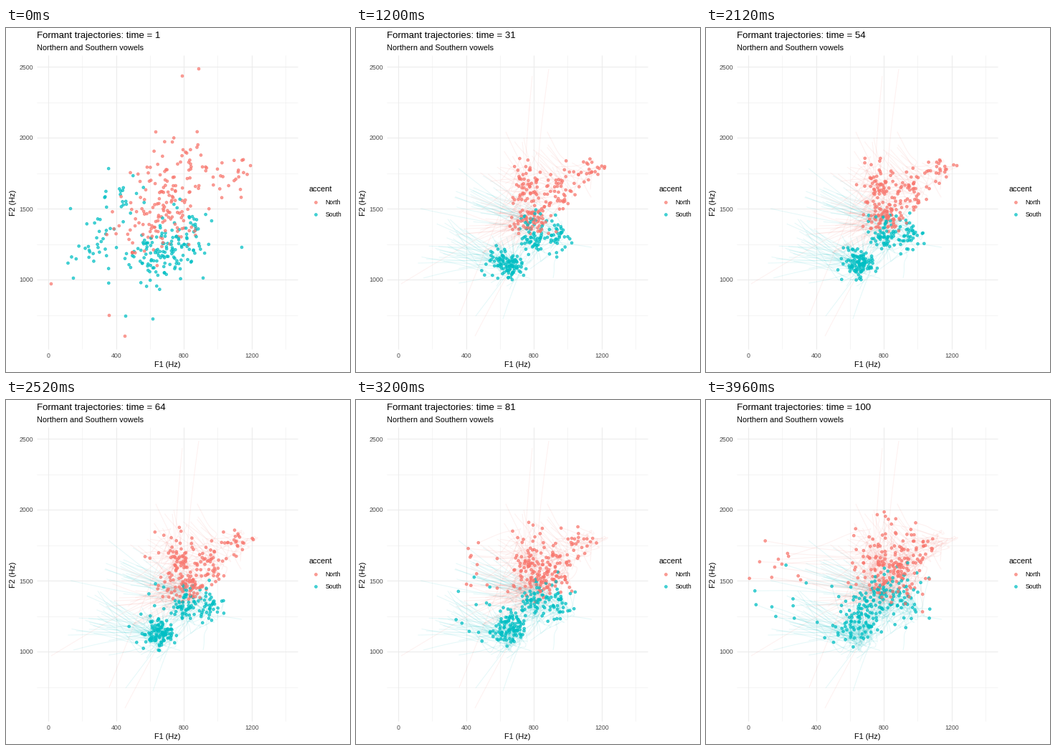
Animation of 480 by 480 pixels, one loop 4 s. Source, as a matplotlib script:

```python
import numpy as np
import matplotlib.pyplot as plt
from matplotlib.animation import FuncAnimation
from matplotlib.collections import LineCollection
from matplotlib.colors import to_rgba

plt.rcParams["font.family"] = "Liberation Sans"

SIZE, DPI = 480, 72
FRAMES, INTERVAL = 100, 40
LEFT, RIGHT, TOP, BOTTOM = 43, 407, 38, 448
NORTH, SOUTH = "#F8766D", "#00BFC4"
rng = np.random.default_rng(12)
time = np.arange(FRAMES)[:, None, None]


def px(f1):
    return 59.2 + f1 * 0.2362


def py(f2):
    return 351.3 - (f2 - 1000) * 0.198


def vowel(n, start, mid, end, spread, tail=0.06):
    """Tracks of n tokens: scattered onset, tight middle, loose offset."""
    own = rng.normal(size=(n, 2))

    def cloud(centre, scale):
        z = 0.6 * own + 0.8 * rng.normal(size=(n, 2))
        return centre + np.clip(z, -2.3, 2.3) * scale * np.array(spread)

    a, b, c = cloud(start, 1.9), cloud(mid, 1), cloud(end, 1.7)

    # some tokens lose their first formant at the end
    lost = rng.random(n) < tail
    c[lost, 0] = rng.uniform(px(0), px(500), lost.sum())

    onset = np.exp(-time / 16)
    power = rng.uniform(1.2, 2.2, (n, 1))
    offset = np.clip((time - 35) / 64, 0, 1) ** power
    beat = rng.uniform(0.05, 0.2, (n, 2))
    phase = rng.uniform(0, 2 * np.pi, (n, 2))
    waver = 1.2 * np.sin(time * beat + phase)
    track = b + (a - b) * onset + (c - b) * offset + waver
    track[..., 0] = np.maximum(track[..., 0], px(0))
    return track


def accent(vowels, strays):
    """Join the vowels; a few tokens begin far outside the clouds."""
    tracks = np.concatenate(vowels, axis=1)
    picks = rng.choice(tracks.shape[1], len(strays), replace=False)
    tracks[:, picks] += (strays - tracks[0, picks]) * np.exp(-time / 11)
    return tracks


north = accent([
    vowel(23, (308, 205), (329, 197), (300, 200), (12, 9), 0),
    vowel(46, (253, 214), (290, 227), (273, 234), (13, 16)),
    vowel(56, (218, 224), (241, 214), (244, 222), (10, 17)),
    vowel(72, (203, 280), (250, 268), (252, 238), (14, 12)),
], [(63, 357), (246, 67), (269, 57), (209, 145), (166, 430), (144, 401)])

south = accent([
    vowel(72, (204, 324), (218, 333), (217, 305), (9, 10), 0.1),
    vowel(32, (130, 303), (212, 332), (206, 307), (10, 12), 0.16),
    vowel(40, (238, 306), (250, 295), (246, 273), (8, 7)),
    vowel(38, (258, 290), (285, 290), (282, 275), (9, 14), 0),
    vowel(22, (163, 240), (258, 274), (250, 262), (9, 10)),
], [(90, 252), (94, 349), (329, 306), (205, 406), (167, 402)])

hues = np.repeat([NORTH, SOUTH], [north.shape[1], south.shape[1]])
tracks = np.concatenate([north, south], axis=1)
order = rng.permutation(len(hues))
tracks, hues = tracks[:, order], hues[order]

fig = plt.figure(figsize=(SIZE / DPI, SIZE / DPI), dpi=DPI, facecolor="white")
ax = fig.add_axes([0, 0, 1, 1])
ax.set_xlim(0, SIZE)
ax.set_ylim(SIZE, 0)
ax.axis("off")


def grid(f1s, f2s, width):
    style = dict(colors="#EBEBEB", lw=width, zorder=0)
    ax.vlines([px(f) for f in f1s], TOP, BOTTOM, **style)
    ax.hlines([py(f) for f in f2s], LEFT, RIGHT, **style)


def label(x, y, text, size, color="black", **kw):
    return ax.text(x, y, text, fontsize=size, color=color, **kw)


grid(range(200, 1401, 400), range(750, 2251, 500), 0.53)
grid(range(0, 1201, 400), range(1000, 2501, 500), 1.07)

for f in range(0, 1201, 400):
    label(px(f), 460, f"{f}", 8.8, "#4D4D4D", ha="center")
for f in range(1000, 2501, 500):
    label(38, py(f) + 3.2, f"{f}", 8.8, "#4D4D4D", ha="right")

title = label(43, 14, "", 13.2)
label(43, 31, "Northern and Southern vowels", 11)
label(225, 473, "F1 (Hz)", 11, ha="center")
label(15, 243.5, "F2 (Hz)", 11, ha="right", va="center", rotation=90)
label(422.3, 228, "accent", 11)

dot = dict(s=14, linewidths=0.9, alpha=0.7, zorder=3)
for y, name, hue in ((242.6, "North", NORTH), (259.9, "South", SOUTH)):
    ax.scatter([431.6], [y], facecolors=hue, edgecolors=hue, **dot)
    label(445.3, y + 3.2, name, 8.8)

trails = LineCollection([], colors=[to_rgba(c, 0.1) for c in hues],
                        linewidths=1.07, zorder=2, capstyle="butt")
ax.add_collection(trails, autolim=False)
dots = ax.scatter(*tracks[0].T, facecolors=hues, edgecolors=hues, **dot)


def draw(i):
    title.set_text(f"Formant trajectories: time = {i + 1}")
    trails.set_segments(list(tracks[:i + 1].transpose(1, 0, 2)))
    dots.set_offsets(tracks[i])
    return title, trails, dots


anim = FuncAnimation(fig, draw, frames=FRAMES, interval=INTERVAL,
                     repeat=True, repeat_delay=0)
plt.show()
```
